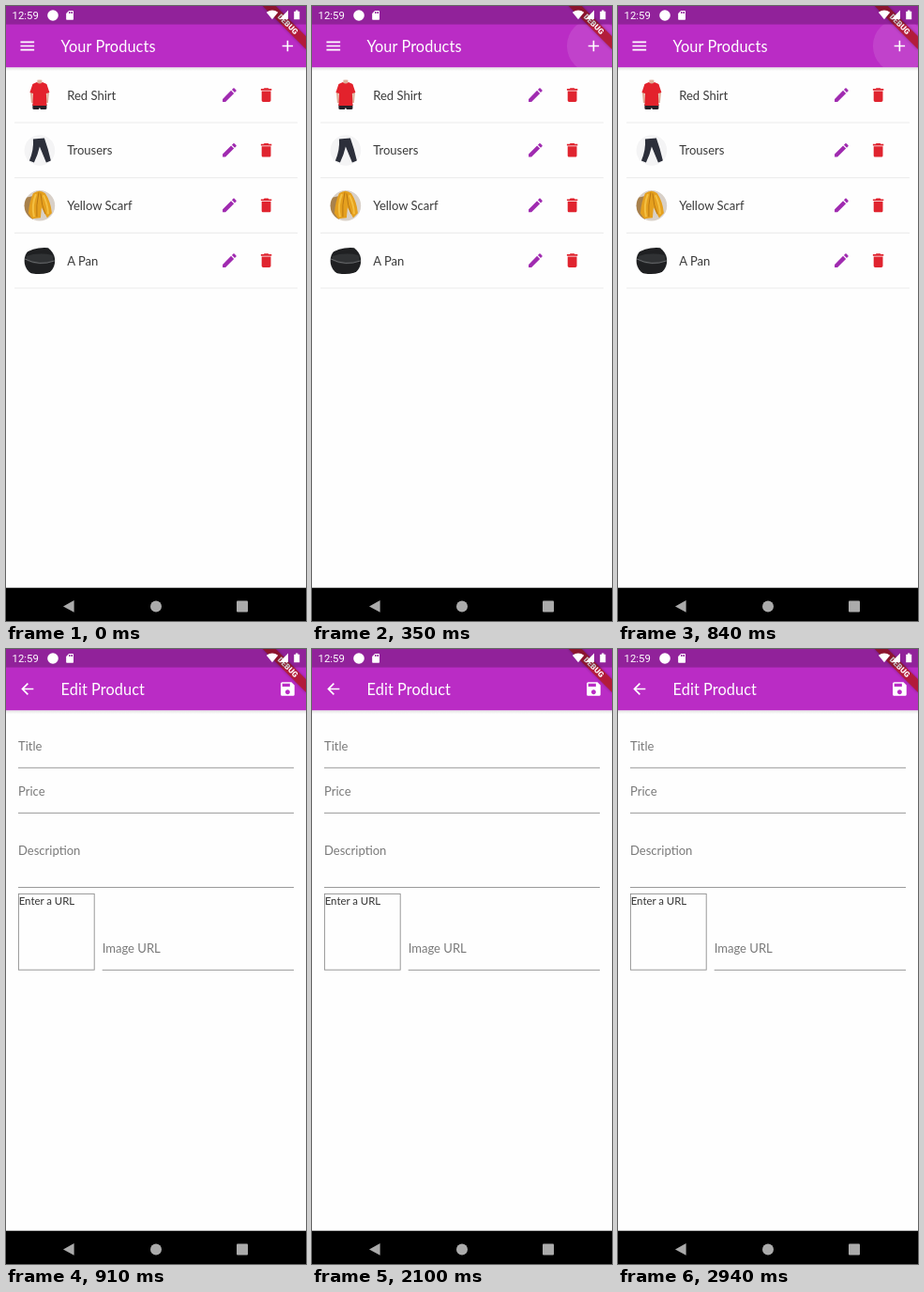
Animation of 320 by 654 pixels, one loop 3010 ms. Source, as an HTML page:

```html
<!DOCTYPE html>
<html lang="en">
<head>
<meta charset="utf-8">
<title>Product list</title>
<style>
html, body { margin: 0; width: 100%; height: 100%; overflow: hidden; background: #fefefe; }
svg { display: block; width: 100vw; height: 100vh; }
text { font-family: Lato, sans-serif; font-size: 13.04px; fill: #3a3a3a; }
.title { font-size: 16.3px; letter-spacing: .1px; fill: #fff; }
.label { fill: #7a7a7a; }
.hint { font-size: 11.4px; fill: #333; }
.clock { font-family: Roboto, sans-serif; font-size: 11.3px; fill: #fff; }
.debug { font-family: Roboto, sans-serif; font-size: 8.3px; font-weight: 900; fill: #fff; text-anchor: middle; }
.field { stroke: #8f8f8f; stroke-width: .9; fill: none; }
</style>
</head>
<body>
<svg viewBox="0 0 320 654" preserveAspectRatio="none">
  <defs>
    <linearGradient id="shade" x2="0" y2="1">
      <stop offset="0" stop-color="#000" stop-opacity=".11"/>
      <stop offset="1" stop-color="#000" stop-opacity="0"/>
    </linearGradient>
    <clipPath id="disc"><circle r="16.3"/></clipPath>
    <clipPath id="barClip"><rect y="19.6" width="320" height="45.7"/></clipPath>
    <filter id="blur" x="-20%" y="-80%" width="140%" height="260%"><feGaussianBlur stdDeviation="1.6"/></filter>
    <path id="menu" d="M3 18h18v-2H3v2zm0-5h18v-2H3v2zm0-7v2h18V6H3z"/>
    <path id="back" d="M20 11H7.83l5.59-5.59L12 4l-8 8 8 8 1.41-1.41L7.83 13H20v-2z"/>
    <path id="add" d="M19 13h-6v6h-2v-6H5v-2h6V5h2v6h6v2z"/>
    <path id="save" d="M17 3H5c-1.11 0-2 .9-2 2v14c0 1.1.89 2 2 2h14c1.1 0 2-.9 2-2V7l-4-4zm-5 16c-1.66 0-3-1.34-3-3s1.34-3 3-3 3 1.34 3 3-1.34 3-3 3zm3-10H5V5h10v4z"/>
    <path id="edit" d="M3 17.25V21h3.75L17.81 9.94l-3.75-3.75L3 17.25zM20.71 7.04c.39-.39.39-1.02 0-1.41l-2.34-2.34c-.39-.39-1.02-.39-1.41 0l-1.83 1.83 3.75 3.75 1.83-1.83z"/>
    <path id="trash" d="M6 19c0 1.1.9 2 2 2h8c1.1 0 2-.9 2-2V7H6v12zM19 4h-3.5l-1-1h-5l-1 1H5v2h14V4z"/>
    <path id="card" d="M18 2h-8L4 8v12c0 1.1.9 2 2 2h12c1.1 0 2-.9 2-2V4c0-1.1-.9-2-2-2zm-6 6h-2V4h2v4zm3 0h-2V4h2v4zm3 0h-2V4h2v4z"/>
    <g id="shirt">
      <path fill="#dfb09a" d="M-2.5-17h5v5h-5zM-10-3h2.500L-7 8h-2zM7.500-3H10L9 8H7z"/>
      <path fill="#252128" d="M-7.500 9.500h15V15H1l-1-2-1 2h-6.500z"/>
      <path fill="#e3222c" d="M-3-14Q0-11 3-14L7.500-12 10.500-3 7-2 7.500 11H-7.500L-7-2-10.500-3-7.500-12z"/>
    </g>
    <g id="trousers">
      <path fill="#f4f4f5" d="M-17-17h34v34h-34z"/>
      <path fill="#2c2f3a" d="M-7-12 5-13Q9-2 12 11L7 13 0-4Q-2 5-6 13L-11 11Q-6-1-7-12z"/>
    </g>
    <g id="scarf">
      <path fill="#d8d0c8" d="M-17-17h34v34h-34z"/>
      <path fill="#a8814c" d="M-17-8-8-10-7 17h-10z"/>
      <path fill="#e5a01e" d="M-7-13Q0-18 6-13 12-4 13 8L8 13 2 2 1 13-8 14-12 8Q-11-4-7-13z"/>
      <path fill="none" stroke="#f4c043" stroke-width="2" d="M-4-12Q-9 0-6 12M4-11Q9 0 9 9"/>
      <path fill="none" stroke="#b97712" d="M-1-14Q-4 0-3 12M1-13Q2 0 6 9"/>
    </g>
    <g id="pan">
      <path fill="#1f2022" d="M-17-7Q-8-14 5-14T17-8V9Q8 15-4 14T-17 7z"/>
      <path fill="#303234" d="M-14-5Q-2-9 14-6L15 0Q0 7-14 0z"/>
      <path fill="none" stroke="#66686a" d="M-16-2Q0 6 16 0"/>
    </g>
  </defs>

  <rect width="320" height="654" fill="#fefefe"/>
  <rect y="65.2" width="320" height="4" fill="url(#shade)"/>
  <rect width="320" height="65.2" fill="#ba2cc5"/>

  <g id="listPage">
    <g clip-path="url(#barClip)"><circle id="ripple" cx="300.4" cy="42.5" fill="#fff"/></g>
    <text class="title" x="58.5" y="48.700">Your Products</text>
    <g id="rows"></g>
  </g>

  <g id="formPage">
    <text class="title" x="58.5" y="48.700">Edit Product</text>
    <text class="label" x="13" y="107.5">Title</text>
    <text class="label" x="13" y="155.5">Price</text>
    <text class="label" x="13" y="219.3">Description</text>
    <text class="label" x="102.7" y="322.800">Image URL</text>
    <path class="field" d="M13 126.300H307M13 174.400H307M13 253.500H307M102.700 341.400H307"/>
    <rect class="field" x="13.400" y="260.400" width="80.8" height="80.8"/>
    <text class="hint" x="13.700" y="272.200">Enter a URL</text>
  </g>

  <g transform="translate(320 0) rotate(45)">
    <rect x="-32.6" y="22.8" width="65.2" height="9.8" fill="#000" opacity=".3" filter="url(#blur)"/>
    <rect x="-32.6" y="22.8" width="65.2" height="9.8" fill="#b71c35" opacity=".92"/>
    <text class="debug" y="30.200">DEBUG</text>
  </g>

  <rect width="320" height="19.6" fill="#000" opacity=".22"/>
  <text class="clock" x="6.600" y="14">12:59</text>
  <g fill="#fff">
    <circle cx="50" cy="10" r="5.8"/>
    <use href="#card" transform="translate(62.200 4) scale(.49)"/>
    <path d="M277.800 6.800Q284 2.200 290.200 6.800L284 14.300z"/>
    <path d="M301 4.500V14h-9.500z"/>
    <path d="M309 4.500h2.400v1.200h1.800V14.300h-6V5.700h1.800z"/>
  </g>

  <rect y="618.7" width="320" height="35.3"/>
  <g fill="#ababab">
    <path d="M61 638.400 72.600 632V644.800z"/>
    <circle cx="160" cy="638.400" r="6"/>
    <rect x="246" y="632.400" width="12" height="12" rx="1"/>
  </g>
</svg>
<script>
const LOOP = 3010, STEP = 70, CUT = 910, PRESS = 70;
const $ = id => document.getElementById(id);
const icon = (id, x, y, fill = '#fff') =>
  `<use href="#${id}" fill="${fill}" transform="translate(${x - 9.78} ${y - 9.78}) scale(.815)"/>`;

const products = [['shirt', 'Red Shirt'], ['trousers', 'Trousers'], ['scarf', 'Yellow Scarf'], ['pan', 'A Pan']];
$('rows').innerHTML = products.map(([photo, name], i) => {
  const y = 94.6 + i * 58.67;
  return `<g transform="translate(35.9 ${y + .3})"><g clip-path="url(#disc)"><use href="#${photo}"/></g></g>
    <text x="65.2" y="${y + 5.1}">${name}</text>
    ${icon('edit', 238.4, y, '#a02bb0')}${icon('trash', 277.6, y, '#e0242f')}
    <path d="M9 ${y + 29.4}H311" stroke="#e9e9e9" stroke-width=".9"/>`;
}).join('');
$('listPage').insertAdjacentHTML('beforeend', icon('menu', 22.8, 42.5) + icon('add', 300.4, 42.5));
$('formPage').insertAdjacentHTML('beforeend', icon('back', 22.8, 42.5) + icon('save', 300.4, 42.5));

function draw(time) {
  const t = Math.floor(time % LOOP / STEP) * STEP;
  const form = t >= CUT;
  $('listPage').style.display = form ? 'none' : '';
  $('formPage').style.display = form ? '' : 'none';
  const p = Math.min(1, Math.max(0, (t - PRESS + STEP) / 210));
  const grow = 1 - (1 - p) ** 2;
  $('ripple').setAttribute('r', 28.5 * grow);
  $('ripple').setAttribute('opacity', .1 * Math.min(1, p * 2));
}

const start = performance.now();
function tick() {
  draw(performance.now() - start);
  requestAnimationFrame(tick);
}
tick();
</script>
</body>
</html>
```
